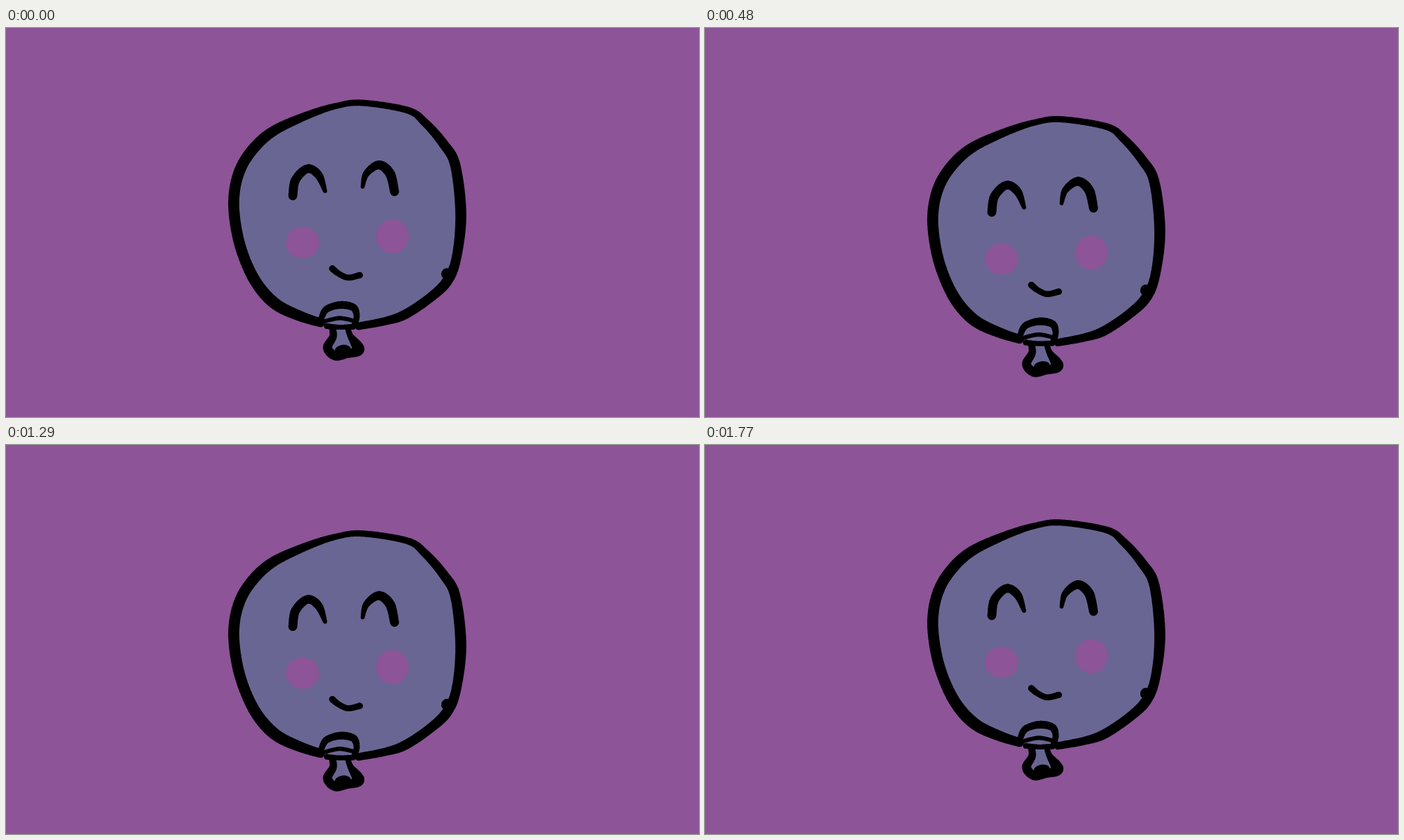
An HTML page with a canvas that plays this animation: 998x561 px, repeating every 1810 ms.

```html
<!DOCTYPE html>
<html>
<head>
<meta charset="utf-8">
<style>
html, body { margin: 0; width: 100%; height: 100%; overflow: hidden; background: #8d5497 }
canvas { display: block }
</style>
</head>
<body>
<canvas id="stage" width="998" height="561"></canvas>
<script>
const ctx = document.getElementById('stage').getContext('2d');
const INK = '#000', SKIN = '#6a6693', PINK = '#8d5497';
const STEP = 40, LOOP = 1810, SECOND = 1130;

// Smooth curve through key points [x, y, radius], sampled densely
function curve(keys) {
  const at = i => keys[Math.max(0, Math.min(keys.length - 1, i))];
  const out = [];
  for (let i = 0; i < keys.length - 1; i++) {
    for (let u = 0; u <= 1; u += 1 / 32) {
      out.push(at(i).map((b, k) => {
        const a = at(i - 1)[k], c = at(i + 1)[k], d = at(i + 2)[k];
        return b + u / 2 * (c - a + u * (2 * a - 5 * b + 4 * c - d + u * (3 * b - a - 3 * c + d)));
      }));
    }
  }
  return out;
}

// Pen line whose width follows the radii; an optional fill lies under it
function pen(keys, fill) {
  const line = new Path2D(), area = new Path2D();
  for (const [x, y, r] of curve(keys)) {
    area.lineTo(x, y);
    line.moveTo(x + r, y);
    line.arc(x, y, r, 0, 7);
  }
  return fill ? [[fill, area], [INK, line]] : [[INK, line]];
}

function oval(color, x, y, rx, ry, turn = 0) {
  const path = new Path2D();
  path.ellipse(x, y, rx, ry, turn, 0, 7);
  return [[color, path]];
}

const body = pen([
  [453, 425, 6.5], [425, 416, 7.5], [391, 400, 8.5], [365, 374, 8.5], [346, 339, 8],
  [333, 297, 8], [328, 250, 8], [335, 210, 8], [353, 178, 8], [383, 150, 7.5],
  [431, 127, 6], [475, 112.5, 4.5], [513, 108, 4.5], [578, 118.5, 5], [603, 136, 6],
  [630, 167, 7], [647, 198, 7.5], [655, 268, 8], [649, 330, 7], [636, 364, 7.5],
  [612, 388, 7], [575, 413, 7], [545, 423, 6], [508, 430, 5.5]
], SKIN);

const spout = pen([
  [492, 432, 4], [496, 444, 4.5], [506, 459, 8], [506, 465, 8.5], [492, 471, 5],
  [474, 473, 6.5], [463, 461, 6.5], [471, 445, 5.5], [470, 432, 5]
], SKIN);

const shapes = [
  body,
  oval(INK, 634, 354, 7, 8, .5),
  // eyes
  pen([[413, 242, 6.5], [417, 219, 6.5], [434, 203, 6.3], [450, 212, 6], [459.5, 235, 3]]),
  pen([[513.5, 229, 2.8], [519, 210, 4.8], [537, 197.5, 6.5], [553, 210, 7], [559.5, 236, 6.5]]),
  // cheeks
  oval(PINK, 427, 309.5, 24, 22.5),
  oval(PINK, 556.5, 300.5, 23.5, 24.5),
  // smile
  pen([[470, 347, 4.8], [480, 355, 4.5], [493, 360, 4.3], [509.5, 356.5, 4.6]]),
  // neck
  spout,
  oval(INK, 485, 464, 11.5, 7, -.15),
  pen([[453, 422, 4], [461, 406, 5], [481, 399.5, 5.5], [500, 403, 5.5], [505, 415, 4.5], [502, 428, 4.5]]),
  pen([[459, 423, 3], [480, 418.5, 3], [500, 422, 3]]),
  pen([[462, 430, 4], [480, 431.5, 3.5], [500, 431, 4]])
].flat();

function draw(now) {
  const t = now % LOOP;
  // two dips, down and up in 18 even steps, with a rest between them
  const step = t < SECOND ? Math.min(18, Math.floor(t / STEP)) : Math.floor((t - SECOND) / STEP) + 1;
  const drop = 3.95 * (9 - Math.abs(9 - step));
  ctx.setTransform(1, 0, 0, 1, 0, 0);
  ctx.fillStyle = PINK;
  ctx.fillRect(0, 0, 998, 561);
  ctx.translate(0, drop);
  for (const [color, path] of shapes) {
    ctx.fillStyle = color;
    ctx.fill(path);
  }
}

const start = performance.now();
function loop() {
  draw(performance.now() - start);
  requestAnimationFrame(loop);
}
loop();
</script>
</body>
</html>
```
